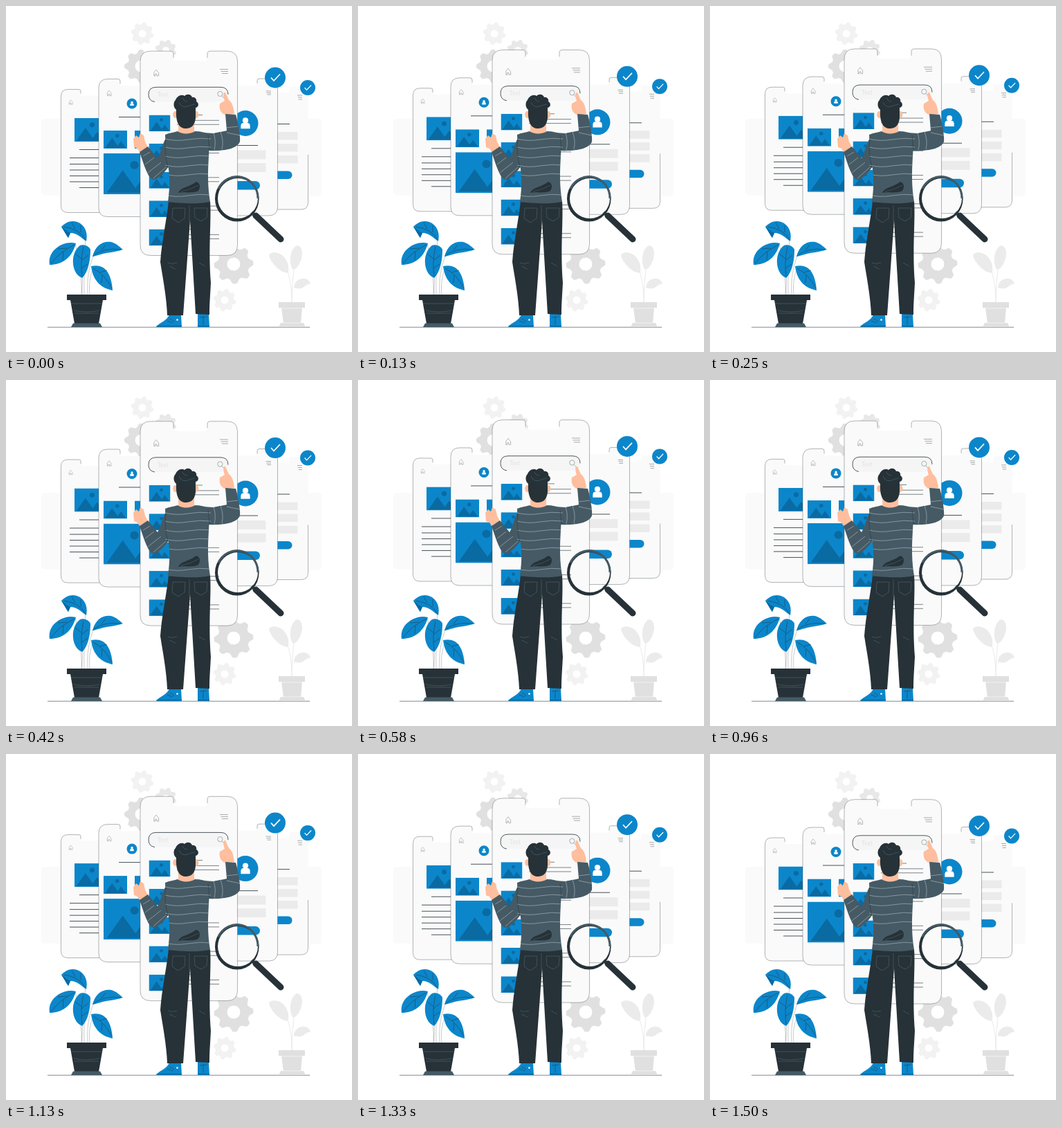
Animation, 500 px wide and 500 px high, one loop 1540 ms. Source, as an HTML page:

```html
<!DOCTYPE html>
<html lang="en">
<head>
<meta charset="utf-8">
<title>App search</title>
<style>
  html, body { margin: 0; height: 100%; overflow: hidden; background: #fff; }
  svg { display: block; }
  #stage { width: 100vw; height: 100vh; }
  .thin { fill: none; stroke: #263238; stroke-width: .45; stroke-opacity: .8; }
  .blue { fill: #0c86ca; }
  .deep { fill: #0a6aa2; }
  .dark { fill: #263238; }
  .slate { fill: #455a64; }
  .skin { fill: #ffbe9d; }
  .pale { fill: #ebebeb; }
  .grey { fill: #e0e0e0; }
  .vein { fill: none; stroke: #263238; stroke-width: .5; }
  .seam { fill: none; stroke: #52656f; stroke-width: .6; }
  .stripe { fill: none; stroke: #b4bec4; stroke-width: .6; }
</style>
</head>
<body>
<svg id="stage" viewBox="0 0 500 500"></svg>
<script>
const path = (cls, d) => `<path class="${cls}" d="${d}"/>`;
const rect = (x, y, w, h, fill, r = 0) =>
  `<rect x="${x}" y="${y}" width="${w}" height="${h}" rx="${r}" fill="${fill}"/>`;
const line = (x1, x2, y, w = .85) =>
  `<path d="M${x1} ${y}H${x2}" stroke="#263238" stroke-width="${w}"/>`;

function gear(cx, cy, r, hole, fill, turn = 0) {
  let d = '';
  for (let i = 0; i < 32; i++) {
    const a = (i + turn) * Math.PI / 16;
    const q = i % 4 < 2 ? r : r * .8;
    d += `${i ? 'L' : 'M'}${(cx + q * Math.cos(a)).toFixed(1)} ${(cy + q * Math.sin(a)).toFixed(1)}`;
  }
  return `<path fill="${fill}" fill-rule="evenodd" stroke="${fill}" stroke-linejoin="round" d="${d}Z
    M${cx - hole} ${cy}a${hole} ${hole} 0 1 0 ${2 * hole} 0a${hole} ${hole} 0 1 0 ${-2 * hole} 0Z"/>`;
}

// Screen from (x, y) to (x2, y2) with a notch between n1 and n2.
function phone(x, y, x2, y2, r, n1, n2, depth, edge = '') {
  const q = depth * .3, k = depth - q;
  const left = `M${n1} ${y + k}V${y + q}Q${n1} ${y} ${n1 - q} ${y}H${x + r}Q${x} ${y} ${x} ${y + r}V${y2 - r}Q${x} ${y2} ${x + r} ${y2}H${x2 - r}Q${x2} ${y2} ${x2} ${y2 - r}`;
  const right = `V${y + r}Q${x2} ${y} ${x2 - r} ${y}H${n2 + q}Q${n2} ${y} ${n2} ${y + q}V${y + k}`;
  const notch = `Q${n2} ${y + depth} ${n2 - q} ${y + depth}H${n1 + q}Q${n1} ${y + depth} ${n1} ${y + k}Z`;
  return `<path fill="#fafafa" d="${left}${right}${notch}"/>` + path('thin', left + (edge || right));
}

const picture = (x, y, w, h) => `<svg x="${x}" y="${y}" width="${w}" height="${h}" viewBox="0 0 100 80" preserveAspectRatio="none">
  <rect class="blue" width="100" height="80"/>
  <g class="deep"><path d="M6 77L36 33L60 68L74 47L95 77Z"/><circle cx="58" cy="23" r="8"/></g></svg>`;

const avatar = (x, y, r) => `<g transform="translate(${x} ${y}) scale(${r / 18})"><circle class="blue" r="18"/>
  <circle cy="-4" r="4" fill="#fff"/><path fill="#fff" d="M-6.5 7.5V4Q-6.5 -.5 -3 -.5H3Q6.5 -.5 6.5 4V7.5Z"/></g>`;

const check = (x, y, r) => `<g transform="translate(${x} ${y}) scale(${r / 15})"><circle class="blue" r="15"/>
  <path d="M-6 0L-2 4.5L7 -5" fill="none" stroke="#fff" stroke-width="1.7"/></g>`;

const home = (x, y, s) => `<path class="thin" transform="translate(${x} ${y}) scale(${s})"
  d="M-4 0L0 -5L4 0V5H1V2H-1.5V5H-3.5V0"/>`;

const menu = (x, y, w, gap) => [0, 1, 2].map(i => line(x + i * w * .12, x + w, y + i * gap, .4)).join('');

const farLeft = phone(79.5, 120.5, 190, 298.5, 10, 108, 160, 9) + home(93.5, 139, .65)
  + picture(99, 162, 44, 34)
  + [207.5, 219.5, 228.5, 237, 245.5, 254, 262.5].map((y, i) => line(i % 6 ? 92 : 106, 135, y)).join('');

const farRight = phone(330, 116.5, 436.5, 294, 10, 360, 409, 9, 'V215') + menu(421, 129, 7, 3)
  + line(390, 410, 170.5)
  + [182, 199, 216].map(y => rect(370, y, 51.5, 11.5, '#ebebeb')).join('')
  + rect(370, 238.5, 43.5, 11.5, '#0c86ca', 5.7);

const midLeft = phone(134, 105.5, 245, 304.5, 13, 165, 213, 10) + home(149, 126, .75)
  + avatar(182, 141, 7.5) + line(163, 200, 160.5)
  + picture(141, 180, 34, 26) + picture(186, 180, 34, 26) + picture(141, 213, 77, 59);

const midRight = phone(283, 105, 392.5, 303, 13, 315, 363, 10) + menu(375.5, 123, 7.5, 2.5)
  + line(320, 364, 201.5)
  + rect(300, 208.5, 75.5, 13, '#ebebeb') + rect(300, 227, 75.5, 13, '#ebebeb')
  + rect(300, 253, 67, 12.5, '#0c86ca', 6.2);

const search = rect(206, 117, 115, 21.5, '#f5f5f5', 10)
  + '<path d="M215 138.5Q206 137 206 128Q206 117.3 217 117.3H310Q321 117.3 321 128" fill="none" stroke="#263238" stroke-width=".8"/>'
  + '<text x="219" y="131" font-family="Lato, sans-serif" font-size="8.5" fill="#e2e2e2">Text</text>'
  + path('thin', 'M313 127a3.6 3.6 0 1 0 -7.2 0a3.6 3.6 0 1 0 7.2 0M312 130L316 134');

const rows = [157.5, 198.7, 240, 281.3, 322.6].map(y => picture(206.5, y, 31, 23.8)
  + line(247, 284, y, .6) + line(247, 308, y + 7.8, .6) + line(247, 308, y + 13.8, .6)).join('');

const main = phone(194, 65.2, 334.5, 360.5, 15, 242, 291, 14)
  + home(217, 96.5, .9) + menu(309, 91.5, 12, 3) + search + rows;

const plant = '<g opacity=".5">'
  + path('vein', 'M109 417C112 390 110 370 108 352M113 417C112 370 116 350 114 338M118 417C116 385 124 370 126 360M121 417C119 395 124 385 126 378M110 417C108 380 104 360 100 344')
  + '</g>'
  + path('blue', 'M116 340C120 322 108 311 97 311C88 311 83 316 80 319C84 325 87 331 90 335L93 328C103 328 110 336 116 340Z')
  + path('blue', 'M101 343C85 338 59 352 63 374C80 374 95 365 101 343Z')
  + path('blue', 'M125 362C129 346 140 339 152 341C160 343 165 349 169 352C158 356 145 356 137 359C131 360 128 362 125 362Z')
  + path('blue', 'M123 376C140 372 152 382 154 411C140 408 126 400 123 376Z')
  + path('blue', 'M110 393C94 387 92 357 107 346C112 344 120 347 122 352C122 370 118 385 110 393Z')
  + path('deep', 'M80 319C84 325 87 331 90 335L93 328C88 326 85 322 80 319Z')
  + path('vein', 'M115 338Q106 322 84 319M108 327V317M100 322L95 313M99 345Q78 355 65 372M88 350L75 351M83 355L82 367M127 360Q142 349 166 352M138 353L144 345M126 379Q143 388 153 408M136 385L146 382M139 389L138 400M112 348Q107 370 110 391M109 365L100 358M109 368L119 360M109 379L118 373')
  + path('dark', 'M88 417H145V425H88ZM93 425H140L134 459H99Z')
  + path('slate', 'M97 458.5H136L139 464H94Z')
  + path('seam', 'M94 430H139M98 440Q116 444 135 440M99 444H134');

const palePlant = path('pale', 'M408 385C402 388 384 376 380 360C382 354 396 355 402 363C408 370 409 378 408 385Z')
  + path('pale', 'M415 381C408 372 410 352 420 346C428 346 430 358 426 368C423 376 419 380 415 381Z')
  + path('pale', 'M416 408C416 398 424 393 432 394C437 395 440 399 440 402C435 401 432 406 427 408C422 409 418 407 416 408Z')
  + '<path d="M407 384Q413 400 413 428M416 380Q413 405 413 428" fill="none" stroke="#ebebeb"/>'
  + path('grey', 'M394 428H432V436H394ZM398 436H428L426 459H401ZM397 458H430L433 464H394Z')
  + '<path d="M398 437H428M401 458H426" stroke="#f0f0f0" fill="none"/>';

// The rim is thicker at the lower left.
const lens = `<path d="M355 298L361 304" stroke="#455a64" stroke-width="5"/>
  <path d="M361 303L397 337" stroke="#263238" stroke-width="9" stroke-linecap="round"/>
  <path class="dark" fill-rule="evenodd" d="M302 278.5a31.8 33 0 1 0 63.6 0a31.8 33 0 1 0 -63.6 0Z
    M306 278a29 29 0 1 0 58 0a29 29 0 1 0 -58 0Z"/>
  <path d="M307 264A30 31 0 0 1 364 278" fill="none" stroke="#455a64" stroke-width="3"/>`;

const sweater = [
  'M248 181C255 186 267 185 273 181C281 181 288 183 293 185C296 210 288 240 295 283C275 287 250 285 234 283C237 262 238 240 231 218L230 186C236 183 242 183 248 181Z',
  'M240 184C231 186 228 196 222 214L219 220L205 203L193 211C198 225 203 243 210 250C215 253 224 248 235 232Z',
  'M284 183L300 184C308 182 316 181 319 180L317 156L332 157C336 170 339 190 338 196C334 206 318 210 290 209Z'
].map(d => path('slate', d)).join('');
const stripes = [192, 204, 217, 230, 243, 273].map(y => `M230 ${y}q16 4 33 1t33 -1`).join('')
  + 'M198 217L208 211M201 229L214 219M205 241L224 226M213 249L231 233M300 184Q304 195 301 208M310 182Q315 195 312 207M318 176L335 174M319 183L338 187';

const man = path('skin', 'M184 192L188 187L192 190L194 184L199 187L201 196L205 204L193 211L190 206L185 204Z')
  + path('skin', 'M309 141C307 150 312 157 318 157L330 156C329 147 327 139 322 136L317 125C313 124 314 131 316 137Z')
  + path('skin', 'M249 165H272V182Q261 188 249 182Z')
  + '<ellipse class="skin" cx="244.5" cy="157" rx="3.3" ry="5"/><ellipse class="skin" cx="275" cy="157" rx="3.3" ry="5"/>'
  + path('dark', 'M246 150C241 146 242 138 245 136C247 130 254 127 258 130C262 126 268 128 269 132C274 131 276 136 275 138C279 140 279 146 274 147V162C273 172 268 177 260 177C251 177 245 170 246 150Z')
  + path('seam', 'M250 139Q254 148 262 145T273 142M255 133Q257 138 262 138')
  + path('blue', 'M217 464C220 458 232 456 236 446H253L254 464ZM277 445H293L294 464H277Z')
  + path('vein', 'M217 462.5H254M277 462.5H294M233 455L241 458M237 452L243 456M280 450L290 449M285 449V461')
  + '<circle cx="247.5" cy="453.5" r="1.3" fill="#fff"/>'
  + path('dark', 'M235 281C255 285 280 285 295 282C297 310 292 350 296 400C295 420 294 430 294 446L274 445L266 310L256 447L233 447C232 420 226 390 223 370C225 340 233 305 235 281Z')
  + path('seam', 'M241 292H259L258 307L249 313L240 307ZM272 292H291L290 306L282 311L273 306ZM265 288V312M234 371Q240 374 247 371M236 376L245 380M279 371L288 376')
  + sweater
  + `<clipPath id="knit">${sweater}</clipPath><g clip-path="url(#knit)">${path('stripe', stripes)}</g>`
  + path('vein', 'M231 193Q228 210 234 234M292 187L294 208')
  + path('dark', 'M249 270C252 262 262 263 275 254C282 256 281 266 276 268C265 271 255 268 249 270Z')
  + path('seam', 'M253 268Q266 266 278 259');

document.getElementById('stage').innerHTML =
  rect(51, 163, 60, 110.5, '#fafafa', 5) + rect(400, 163, 56, 112, '#fafafa', 5)
  + gear(197, 40, 16, 6, '#f2f2f2', .5) + gear(195, 87, 23.5, 9, '#e0e0e0', -.5) + gear(231, 64, 15, 5.5, '#e8e8e8', 1)
  + gear(329, 373, 28, 10, '#e0e0e0', -.8) + gear(316, 425, 16, 6, '#f2f2f2', .5)
  + `<g id="float">${farLeft}${farRight}${midLeft}${midRight}${avatar(346, 169.5, 18.5)}${main}${check(389, 103.5, 15)}${check(436, 118, 11)}</g>`
  + '<path d="M60 464.2H439" stroke="#455a64" stroke-width=".7"/>'
  + plant + palePlant + lens + man;

const LOOP = 1540, LIFT = 10, START = 55;
const lift = t => {
  const p = (t + START) / LOOP % 1;
  return LIFT * (1 - Math.abs(2 * p - 1));
};
const floating = document.getElementById('float');
const t0 = performance.now();
function draw() {
  const t = performance.now() - t0;
  floating.setAttribute('transform', `translate(0 ${(lift(0) - lift(t)).toFixed(2)})`);
  requestAnimationFrame(draw);
}
draw();
</script>
</body>
</html>
```
